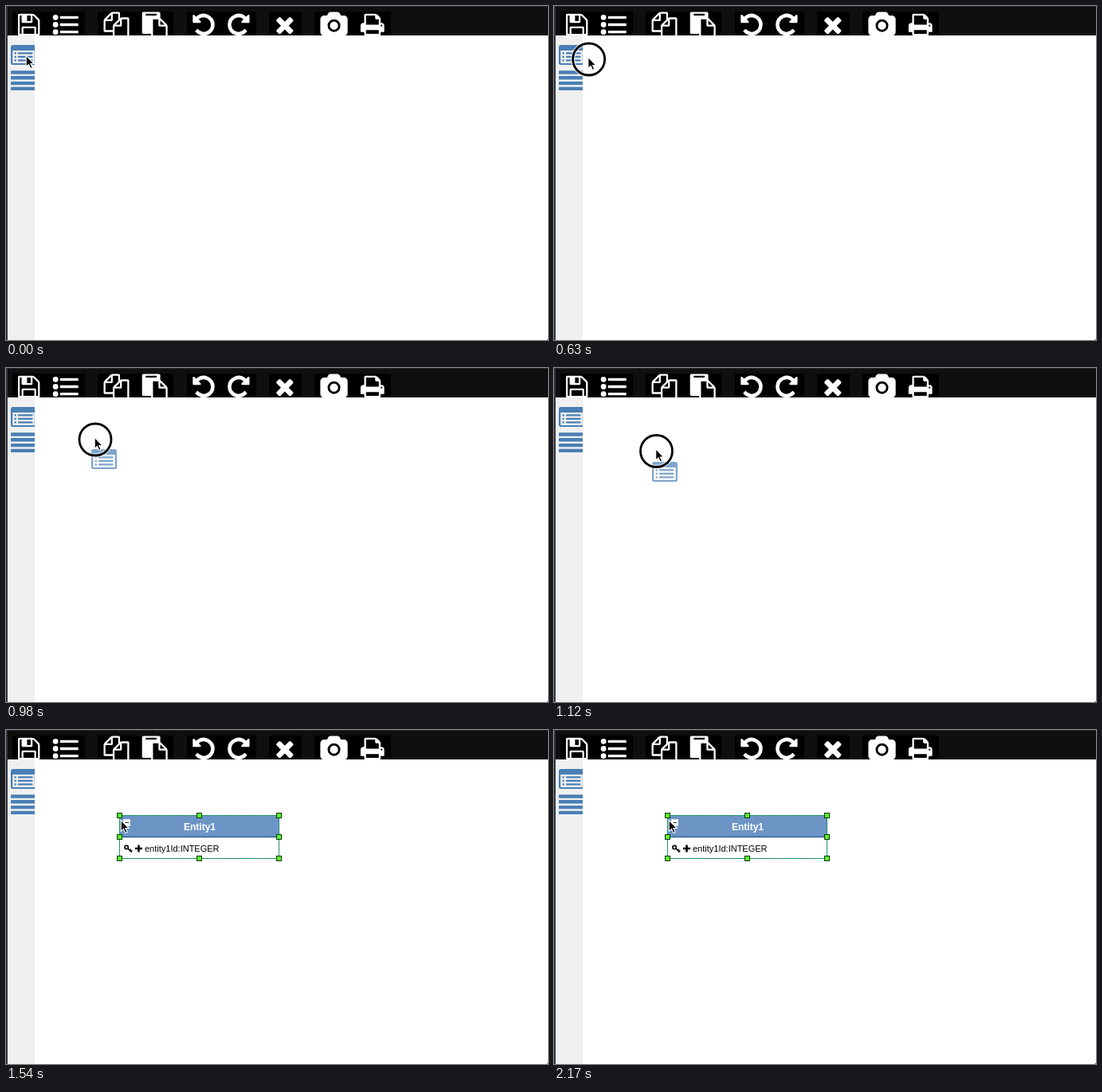
These frames come from a looping animation (680 by 420 pixels, 2.24 s). An HTML page:

```html
<!DOCTYPE html>
<html lang="en">
<head>
<meta charset="utf-8">
<title>Entity editor</title>
<style>
html, body { margin: 0; width: 100%; height: 100%; overflow: hidden; background: #fff; }
svg { display: block; width: 680px; height: 420px; }
text { font-family: "Liberation Sans", Arial, sans-serif; }
</style>
</head>
<body>
<svg id="stage" viewBox="0 0 680 420">
  <defs>
    <clipPath id="barClip"><rect width="680" height="38"/></clipPath>
    <clipPath id="sideClip"><rect y="37" width="36" height="383"/></clipPath>
    <g id="card">
      <path fill-rule="evenodd" d="M2.9 0H29.1A2.9 2.9 0 0 1 32 2.9V22.2A2.9 2.9 0 0 1 29.1 25.1H2.9A2.9 2.9 0 0 1 0 22.2V2.9A2.9 2.9 0 0 1 2.9 0ZM2.3 6.9V22.3Q2.3 22.9 2.9 22.9H29.1Q29.7 22.9 29.7 22.3V6.9Z"/>
      <path d="M4.6 10.3h2.3M9.1 10.3H27.4M4.6 14.9h2.3M9.1 14.9H27.4M4.6 19.4h2.3M9.1 19.4H27.4" stroke="currentColor" stroke-width="2.3"/>
    </g>
  </defs>
  <rect width="680" height="420" fill="#fff"/>
  <rect width="680" height="37" fill="#0f0f0f"/>
  <rect width="680" height="1" fill="#222732"/>
  <g id="bar" clip-path="url(#barClip)"></g>
  <rect y="37" width="36" height="383" fill="#f0f0f0"/>
  <g clip-path="url(#sideClip)" fill="#4a7fb5" color="#4a7fb5">
    <use href="#card" x="6" y="49"/>
    <g id="lines"></g>
  </g>
  <rect width="2" height="420" fill="#2e3440"/>
  <rect x="679" y="419" width="1" height="1" fill="#444"/>
  <g id="ghost" fill="#4a7fb5" color="#4a7fb5" opacity=".7"><use href="#card" x="-16" y="-12.5"/></g>
  <g id="entity">
    <rect x="142" y="107" width="200" height="54" fill="#fff"/>
    <rect x="142" y="107" width="200" height="27" fill="#6c95c6"/>
    <path d="M142 134.5H342" stroke="#2f6299" stroke-width="1.4"/>
    <rect x="142.5" y="107.5" width="200" height="54" fill="none" stroke="#4a80a8"/>
    <rect x="142.5" y="107.5" width="200" height="54" fill="none" stroke="#00a23c" stroke-dasharray="3 3"/>
    <rect x="147.5" y="112.5" width="8" height="8" fill="#fff" stroke="#dfe6ee"/>
    <path d="M149.5 116.5h4.5" stroke="#333"/>
    <text x="243" y="126" font-size="12" font-weight="700" fill="#fff" text-anchor="middle">Entity1</text>
    <g stroke="#000" fill="none">
      <circle cx="151.1" cy="147.6" r="2.2" stroke-width="1.6"/>
      <path d="M152.6 148.8L157.6 153.6M155 151.5L156.8 149.8M156.8 153L158.3 151.5" stroke-width="1.5"/>
      <path d="M162 149H171M166.5 144.5V153.5" stroke-width="2.6"/>
    </g>
    <text x="174" y="153" font-size="11" fill="#000">entity1Id:INTEGER</text>
    <g id="grips" fill="#5cf02c" stroke="#0a3a0a"></g>
  </g>
  <g id="ring" fill="none">
    <circle r="20" stroke="#fff" stroke-width="5.5" opacity=".65"/>
    <circle r="20" stroke="#000" stroke-width="2.8"/>
  </g>
  <path id="cursor" d="M0 0V14L3.3 11L5.6 16.3L8 15.2L5.7 10.2H10Z" fill="#000" stroke="#fff" stroke-width="1.1"/>
</svg>
<script>
const $ = id => document.getElementById(id);

function add(parent, tag, attrs) {
  const el = document.createElementNS("http://www.w3.org/2000/svg", tag);
  for (const k in attrs) el.setAttribute(k, attrs[k]);
  return parent.appendChild(el);
}

// Icons are drawn on a 1792-unit grid, 56 units to a pixel.
const save = "M512 1536h768v-384h-768v384zm896 0h128v-896q0-14-10-38.5t-20-34.5l-281-281q-10-10-34-20t-39-10v416q0 40-28 68t-68 28h-576q-40 0-68-28t-28-68v-416h-128v1280h128v-416q0-40 28-68t68-28h832q40 0 68 28t28 68v416zm-384-928v-320q0-32-32-32h-192q-32 0-32 32v320q0 32 32 32h192q32 0 32-32zm640 32v928q0 40-28 68t-68 28h-1344q-40 0-68-28t-28-68v-1344q0-40 28-68t68-28h928q40 0 88 20t76 48l280 280q28 28 48 76t20 88z";
const copy = "M1696 384q40 0 68 28t28 68v1216q0 40-28 68t-68 28h-960q-40 0-68-28t-28-68v-288h-544q-40 0-68-28t-28-68v-672q0-40 20-88t48-76l408-408q28-28 76-48t88-20h416q40 0 68 28t28 68v328q68-40 128-40h416zm-544 213l-299 299h299v-299zm-640-384l-299 299h299v-299zm196 647l316-316v-416h-384v416q0 40-28 68t-68 28h-416v640h512v-256q0-40 20-88t48-76zm956 804v-1152h-384v416q0 40-28 68t-68 28h-416v640h896z";
const paste = "M768 1664h896v-640h-416q-40 0-68-28t-28-68v-416h-384v1152zm256-1440v-64q0-32-32-32h-704q-32 0-32 32v64q0 32 32 32h704q32 0 32-32zm256 672h299l-299-299v299zm512 128v672q0 40-28 68t-68 28h-960q-40 0-68-28t-28-68v-160h-544q-40 0-68-28t-28-68v-1344q0-40 28-68t68-28h1088q40 0 68 28t28 68v328q21 13 36 28l408 408q28 28 48 76t20 88z";
const undo = "M1664 896A768 768 0 0 1 305 1387q-14-20 2-43l137-138q34-20 48 3A512 512 0 1 0 548 521l137 138q31 30 14 69-17 40-59 40h-448q-26 0-45-19t-19-45v-448q0-42 40-59 39-17 69 14l130 129A768 768 0 0 1 1664 896z";
const cross = "M1490 1322q0 40-28 68l-136 136q-28 28-68 28t-68-28l-294-294-294 294q-28 28-68 28t-68-28l-136-136q-28-28-28-68t28-68l294-294-294-294q-28-28-28-68t28-68l136-136q28-28 68-28t68 28l294 294 294-294q28-28 68-28t68 28l136 136q28 28 28 68t-28 68l-294 294 294 294q28 28 28 68z";
const camera = "M896 672a288 288 0 1 1 0 576a288 288 0 1 1 0-576zm704-416q106 0 181 75t75 181v896q0 106-75 181t-181 75h-1408q-106 0-181-75t-75-181v-896q0-106 75-181t181-75h224l51-136q19-49 69.5-84.5t103.5-35.5h512q53 0 103.5 35.5t69.5 84.5l51 136h224zm-704 1152a448 448 0 1 0 0-896a448 448 0 1 0 0 896z";
const print = "M448 1536h896v-256h-896v256zm0-640h896v-384h-160q-40 0-68-28t-28-68v-160h-640v640zm1152 64a64 64 0 1 0-128 0a64 64 0 1 0 128 0zm128 0v416q0 32-32 32h-224v160q0 40-28 68t-68 28h-960q-40 0-68-28t-28-68v-160h-224q-32 0-32-32v-416q0-79 56.5-135.5t135.5-56.5h64v-544q0-40 28-68t68-28h672q40 0 88 20t76 48l152 152q28 28 48 76t20 88v256h64q79 0 135.5 56.5t56.5 135.5z";
const list = [384, 896, 1408].map(y =>
  `M0 ${y}a192 192 0 1 1 384 0a192 192 0 1 1-384 0zM544 ${y - 96}H1760q32 0 32 32v128q0 32-32 32H544q-32 0-32-32v-128q0-32 32-32z`).join("");

for (const [x, w] of [[8, 91], [115, 95], [227, 87], [330, 41], [387, 96]])
  add($("bar"), "rect", { x, y: 7, width: w, height: 30, fill: "#000" });

function icon(d, x, flip = 1) {
  add($("bar"), "path", {
    d, fill: "#fff", "fill-rule": "evenodd",
    transform: `translate(${x} 7.5) scale(${flip / 56} ${1 / 56})`
  });
}
icon(save, 12.7);
icon(list, 58.7);
icon(copy, 122.5);
icon(paste, 170.7);
icon(undo, 232);
icon(undo, 307.8, -1);
icon(cross, 333.8);
icon(camera, 395.5);
icon(print, 443.7);

for (let i = 0; i < 4; i++)
  add($("lines"), "rect", { x: 6, y: 81.3 + i * 6.8, width: 32, height: 4.4, rx: 0.9 });

for (const x of [142, 242, 342])
  for (const y of [107, 134, 161])
    if (x !== 242 || y !== 134)
      add($("grips"), "rect", { x: x - 2.5, y: y - 2.5, width: 6, height: 6 });

const LOOP = 2240, STEP = 70, PRESS = 350, GRAB = 700, DROP = 1540;

// Each key: time, x, y
const hand = [[560, 26, 65], [770, 79, 71], [980, 112, 90], [1120, 128.5, 104.5], [1260, 143, 114.5], [1330, 145, 116]];
const drag = [[700, 75, 97], [770, 92, 100.5], [980, 123, 114.5], [1120, 139, 130.5], [1260, 157, 143], [1330, 160, 145.5]];

function at(keys, t) {
  if (t <= keys[0][0]) return keys[0].slice(1);
  for (let i = 1; i < keys.length; i++) {
    const [t0, x0, y0] = keys[i - 1], [t1, x1, y1] = keys[i];
    if (t <= t1) {
      const k = (t - t0) / (t1 - t0);
      return [x0 + (x1 - x0) * k, y0 + (y1 - y0) * k];
    }
  }
  return keys[keys.length - 1].slice(1);
}

const move = (id, x, y) => $(id).setAttribute("transform", `translate(${x} ${y})`);
const show = (id, on) => $(id).setAttribute("visibility", on ? "visible" : "hidden");

function draw(ms) {
  const t = Math.floor((ms % LOOP) / STEP) * STEP;
  const [x, y] = at(hand, t);
  move("ring", x, y);
  move("cursor", x - 0.8, y - 2.7);
  move("ghost", ...at(drag, t));
  show("ring", t >= PRESS && t < DROP);
  show("ghost", t >= GRAB && t < DROP);
  show("entity", t >= DROP);
}

const start = performance.now();
function tick() {
  draw(performance.now() - start);
  requestAnimationFrame(tick);
}
tick();
</script>
</body>
</html>
```
